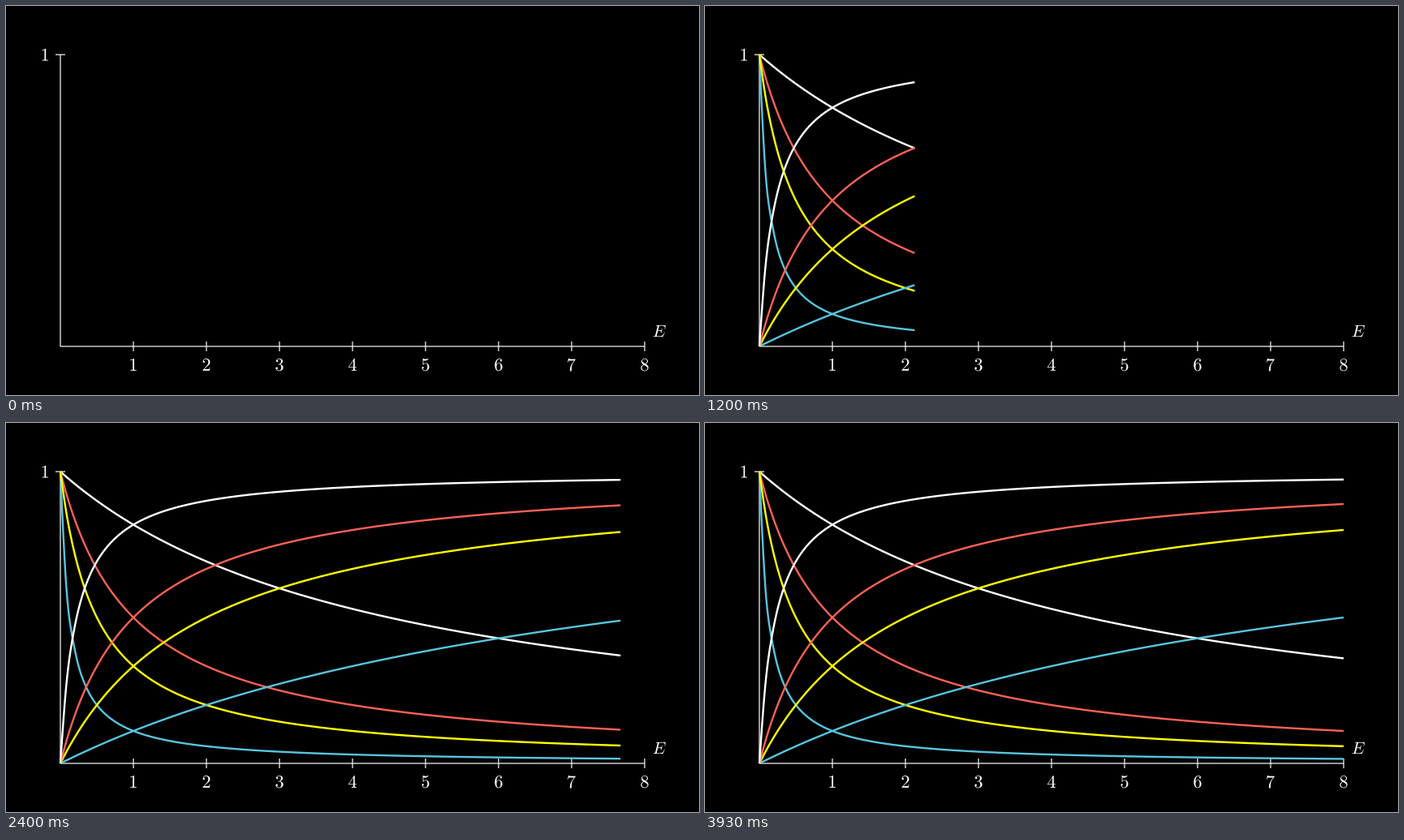
A matplotlib script that plays this animation: 854 by 480 pixels, repeating every 3.99 s.

```python
import matplotlib.pyplot as plt
import numpy as np
from matplotlib.animation import FuncAnimation
from matplotlib.patches import PathPatch
from matplotlib.path import Path
from matplotlib.textpath import TextPath

plt.rcParams.update({"mathtext.fontset": "cm", "path.simplify": False})

W, H, DPI = 854, 480, 64
LOOP_MS, STEP_MS, FPS, DRAW_STEPS = 3990, 10, 15, 45
X0, Y0, UNIT, TALL = 67, 420, 90, 360
E_MAX, SEGMENTS, SUB = 8, 100, 6
WHITE, RED, YELLOW, BLUE = "#ffffff", "#fc6255", "#ffff00", "#58c4dd"

fig = plt.figure(figsize=(W / DPI, H / DPI), dpi=DPI, facecolor="black")
ax = fig.add_axes([0, 0, 1, 1])
ax.set(xlim=(0, W), ylim=(H, 0))
ax.axis("off")


def stroke(xs, ys, color, px):
    line, = ax.plot(xs, ys, color=color, lw=px * 72 / DPI, snap=False,
                    solid_capstyle="butt", solid_joinstyle="round")
    return line


def label(tex, em, x, y, ha=0.5, va=0.5):
    """Place the ink box so that its (ha, va) point, from top left, is at x, y."""
    path = TextPath((0, 0), tex, size=em)
    box = path.get_extents()
    ax_x = box.x0 + ha * box.width
    ax_y = box.y1 - va * box.height
    verts = (path.vertices - [ax_x, ax_y]) * [1, -1] + [x, y]
    ax.add_patch(PathPatch(Path(verts, path.codes), fc=WHITE, lw=0, snap=False))


def natural_spline(y, sub):
    """Natural cubic spline through evenly spaced values."""
    n = len(y)
    m = np.zeros(n)
    a = 4 * np.eye(n - 2) + np.eye(n - 2, k=1) + np.eye(n - 2, k=-1)
    m[1:-1] = np.linalg.solve(a, 6 * np.diff(y, 2))
    s = np.linspace(0, n - 1, (n - 1) * sub + 1)
    i = np.minimum(s.astype(int), n - 2)
    u = s - i
    v = 1 - u
    return (v * y[i] + u * y[i + 1]
            + ((v**3 - v) * m[i] + (u**3 - u) * m[i + 1]) / 6)


def sigmoid(x):
    return 1 / (1 + np.exp(-x))


def smooth(t, k=10):
    low = sigmoid(-k / 2)
    return np.clip((sigmoid(k * (t - 0.5)) - low) / (1 - 2 * low), 0, 1)


# Axes, ticks and labels
stroke([X0, X0 + E_MAX * UNIT], [Y0, Y0], WHITE, 1.2)
stroke([X0, X0], [Y0, Y0 - TALL], WHITE, 1.2)
stroke([X0 - 6, X0 + 6], [Y0 - TALL] * 2, WHITE, 1.2)
label("$1$", 22.4, X0 - 15, Y0 - TALL, ha=1)
for n in range(1, E_MAX + 1):
    x = X0 + n * UNIT
    stroke([x, x], [Y0 - 6, Y0 + 6], WHITE, 1.2)
    label(f"${n}$", 22.4, x, Y0 + 15, va=0)
label("$E$", 20.9, 805.2, 401)

# Saturation curves E/(E+K) and their falling partners 1/(1+KE)
nodes = np.linspace(0, E_MAX, SEGMENTS + 1)
grid = X0 + UNIT * np.linspace(0, E_MAX, SEGMENTS * SUB + 1)
pairs = [(8, BLUE), (2 / 9, WHITE), (1, RED), (2, YELLOW)]
rise_order = [pairs[i] for i in (0, 3, 2, 1)]
shapes = [(1 / (1 + k * nodes), c) for k, c in pairs]
shapes += [(nodes / (nodes + k), c) for k, c in rise_order]
curves = [(stroke([], [], c, 2.4), Y0 - TALL * natural_spline(v, SUB))
          for v, c in shapes]


def update(frame):
    step = int((frame * STEP_MS + 4) * FPS / 1000)
    end = X0 + E_MAX * UNIT * smooth(min(step / DRAW_STEPS, 1))
    keep = grid < end
    for line, ys in curves:
        if end > X0:
            line.set_data(np.append(grid[keep], end),
                          np.append(ys[keep], np.interp(end, grid, ys)))
        else:
            line.set_data([], [])
    return [line for line, _ in curves]


anim = FuncAnimation(fig, update, frames=LOOP_MS // STEP_MS, interval=STEP_MS,
                     repeat=True, repeat_delay=0, init_func=lambda: update(0))
plt.show()
```
